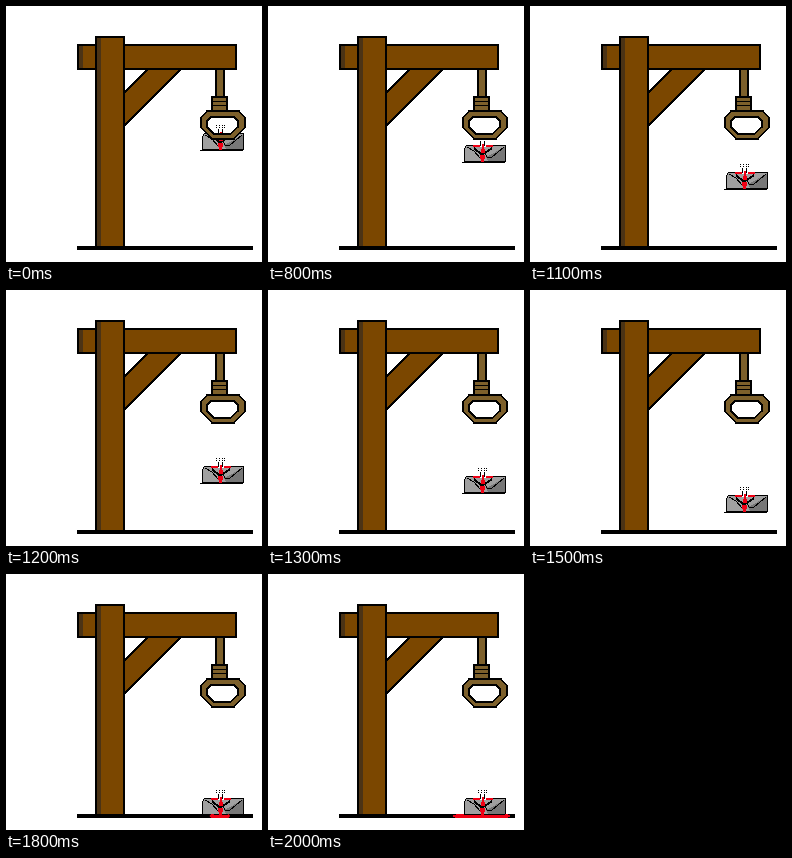
These frames come from a looping animation (256x256 px, 2.6 s). An HTML page:

```html
<!DOCTYPE html>
<html lang="en">
<head>
<meta charset="utf-8">
<title>Gallows</title>
<style>
  html, body { margin: 0; width: 100%; height: 100%; overflow: hidden; background: #fff; }
  svg { display: block; width: 100vw; height: 100vh; }
  .wood { fill: #7b4700; stroke: #000; stroke-width: 2; }
  .shade { fill: #4b3315; }
  .rope { fill: #7d602b; stroke: #000; stroke-width: 1.5; }
  .line { fill: none; stroke: #000; }
  .red { fill: #f00014; }

  .bust { animation: drop 2600ms step-end infinite; }
  .pool { transform-origin: 214px 242px; animation: spread 2600ms step-end infinite; }

  /* Each step lasts 100 ms once the fall begins at 800 ms. */
  @keyframes drop {
    0% { transform: translateY(119px); }
    30.769% { transform: translateY(131px); }
    34.615% { transform: translateY(140px); }
    38.461% { transform: translateY(149px); }
    42.307% { transform: translateY(158px); }
    46.153% { transform: translateY(168px); }
    50% { transform: translateY(178px); }
    53.846% { transform: translateY(187px); }
    57.692% { transform: translateY(197px); }
    61.538% { transform: translateY(208px); }
    65.384%, 100% { transform: translateY(216px); }
  }
  @keyframes spread {
    0% { transform: scaleX(0); }
    69.23% { transform: scaleX(.35); }
    73.076% { transform: scaleX(.68); }
    76.923%, 100% { transform: scaleX(1); }
  }
</style>
</head>
<body>
<svg viewBox="0 0 256 256" shape-rendering="crispEdges">
  <g id="frame">
    <path class="wood" d="M118 87L143 62H176L118 120Z"/>
    <rect class="wood" x="72" y="39" width="158" height="24"/>
    <rect class="shade" x="73" y="40" width="4" height="22"/>
    <rect class="wood" x="90" y="31" width="28" height="210"/>
    <rect class="shade" x="91" y="32" width="4" height="208"/>
    <rect x="71" y="240" width="176" height="4"/>
  </g>

  <g class="bust">
    <path fill="#a0a0a0" stroke="#000" d="M198.500 8.500H237.500V24.500H196.500V11.500Z"/>
    <path fill="#777" d="M237 10V24H220L218 20Z"/>
    <path class="line" d="M194 25.500H237M199 10L206 14L212 21M236 10L230 15L224 20H219L215 13"/>
    <path class="line" stroke-width="2" d="M206 11L214 18L224 11"/>
    <path class="red" d="M205 8H225V10H205ZM213 12H217V16H213ZM212 18H217V22H212ZM213 22H216V25H213Z"/>
    <rect x="212" y="4" width="6" height="6" fill="#fff"/>
    <path class="line" stroke-dasharray="1 1" d="M210.500 0V4M213.500 0V4M216.500 0V4M218.500 0V4"/>
    <path class="line" d="M212.500 4V9M216.500 4V9"/>
    <path class="red" d="M214 7H216V12H214Z"/>
  </g>

  <path class="red pool" d="M188 240H196V241H237V240H240V241H242V243H240V244H187V243H185V241H188Z"/>

  <g id="noose">
    <rect class="rope" x="210" y="63" width="8" height="28"/>
    <path class="rope" fill-rule="evenodd" d="M201 105H233L239 112V121L228 133H206L195 121V112Z
      M205 111L201 115V121L208 128H224L232 121V115L228 111Z"/>
    <rect class="rope" x="206" y="91" width="15" height="14"/>
    <path class="line" d="M206 95.500H221M206 99.500H221"/>
  </g>
</svg>
</body>
</html>
```
